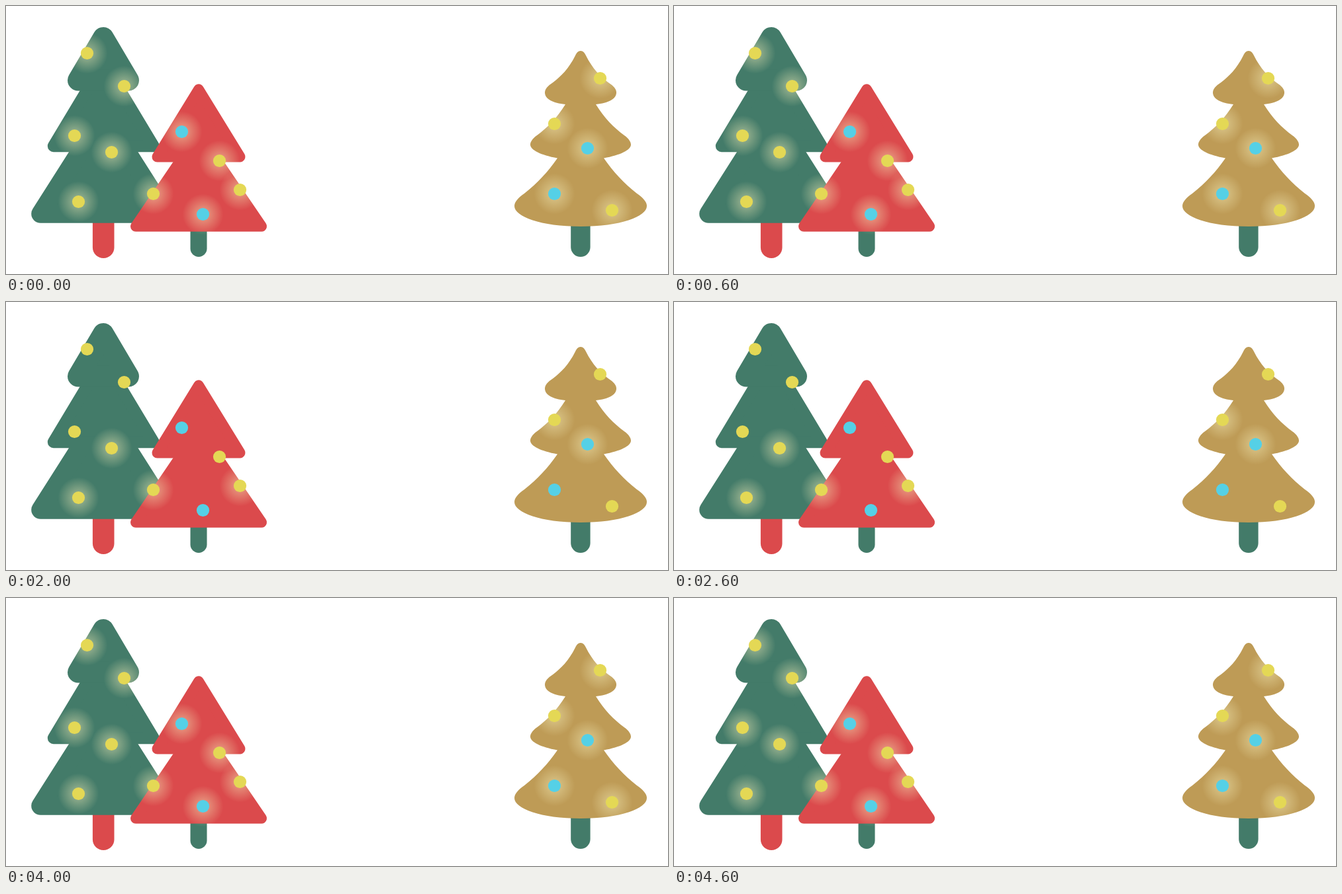
An HTML page with a canvas for the animation above (5 s loop, 1000x406 px).

```html
<!DOCTYPE html>
<html lang="en">
<head>
<meta charset="utf-8">
<title>Twinkling trees</title>
<style>
  html, body { margin: 0; width: 100%; height: 100%; overflow: hidden; background: #fff; }
  canvas { display: block; }
</style>
</head>
<body>
<canvas id="stage" width="1000" height="406"></canvas>
<script>
const ctx = document.getElementById('stage').getContext('2d');
const GREEN = '#437b69', RED = '#db4a4c', GOLD = '#be9b56';
const YELLOW = '#e4d855', BLUE = '#55d0e6';
const GLOW_RADIUS = 31, BALL_RADIUS = 9.6;

// Two strands of lights: [x, y, colour]
const strandA = [
  [122, 71, YELLOW], [178, 121, YELLOW], [103, 196, YELLOW],
  [265, 190, BLUE], [322, 234, YELLOW], [297, 315, BLUE],
  [897, 109, YELLOW], [828, 284, BLUE], [915, 309, YELLOW]
];
const strandB = [
  [159, 221, YELLOW], [109, 296, YELLOW], [222, 284, YELLOW],
  [353, 278, YELLOW], [828, 178, YELLOW], [878, 215, BLUE]
];

// Lit strands for each second of the loop
const steps = [[strandA, strandB], [strandA], [strandB], [], [strandA, strandB]];
const STEP_MS = 1000;

const goldHalf = new Path2D(`M-0.5 68 H0 C4 68 6 71 8 75 C18 95 30 107 42 116
  C50 121 54 126 54 131 C54 141 42 147 23 149
  C36 170 50 184 66 196 C73 201 76 206 76 210 C76 218 60 226 35 230.5
  C50 252 65 268 85 284 C95 291 100 297 100 303 C100 319 60 334 0 334 H-0.5Z`);

function trunk(x, top, bottom, width, color) {
  ctx.strokeStyle = color;
  ctx.lineWidth = width;
  ctx.lineCap = 'round';
  ctx.beginPath();
  ctx.moveTo(x, top);
  ctx.lineTo(x, bottom - width / 2);
  ctx.stroke();
}

// Rounded triangle; the corners are the centres of the rounding circles
function tier(x, apexY, halfWidth, baseY, radius, color) {
  ctx.fillStyle = ctx.strokeStyle = color;
  ctx.lineWidth = radius * 2;
  ctx.lineJoin = 'round';
  ctx.beginPath();
  ctx.moveTo(x, apexY);
  ctx.lineTo(x + halfWidth, baseY);
  ctx.lineTo(x - halfWidth, baseY);
  ctx.closePath();
  ctx.fill();
  ctx.stroke();
}

function drawTrees() {
  trunk(147.2, 315, 382, 32.6, RED);
  tier(147.2, 165, 95, 314.8, 14, GREEN);
  tier(147.3, 86, 75.5, 212.2, 9, GREEN);
  tier(147, 48, 38, 112.5, 16, GREEN);

  trunk(291, 325, 380, 25, GREEN);
  tier(291, 193.8, 95, 333.8, 8, RED);
  tier(291, 126.3, 62.5, 228.5, 8, RED);

  trunk(867.9, 320, 380, 29.4, GREEN);
  ctx.fillStyle = GOLD;
  for (const side of [1, -1]) {
    ctx.save();
    ctx.translate(868, 0);
    ctx.scale(side, 1);
    ctx.fill(goldHalf);
    ctx.restore();
  }
}

function disc(x, y, radius, fill) {
  ctx.fillStyle = fill;
  ctx.beginPath();
  ctx.arc(x + 0.5, y + 0.5, radius, 0, Math.PI * 2);
  ctx.fill();
}

function glow([x, y]) {
  const light = ctx.createRadialGradient(x + 0.5, y + 0.5, 0, x + 0.5, y + 0.5, GLOW_RADIUS);
  light.addColorStop(0, 'rgba(243,236,184,.56)');
  light.addColorStop(1, 'rgba(243,236,184,0)');
  disc(x, y, GLOW_RADIUS, light);
}

function draw(now) {
  const lit = steps[Math.floor(now / STEP_MS) % steps.length];
  ctx.clearRect(0, 0, 1000, 406);
  drawTrees();
  // Light falls only on the trees, not on the background
  ctx.globalCompositeOperation = 'source-atop';
  lit.flat().forEach(glow);
  ctx.globalCompositeOperation = 'source-over';
  for (const [x, y, color] of [...strandA, ...strandB]) disc(x, y, BALL_RADIUS, color);
}

const start = performance.now();
function frame() {
  draw(performance.now() - start);
  requestAnimationFrame(frame);
}
frame();
</script>
</body>
</html>
```
